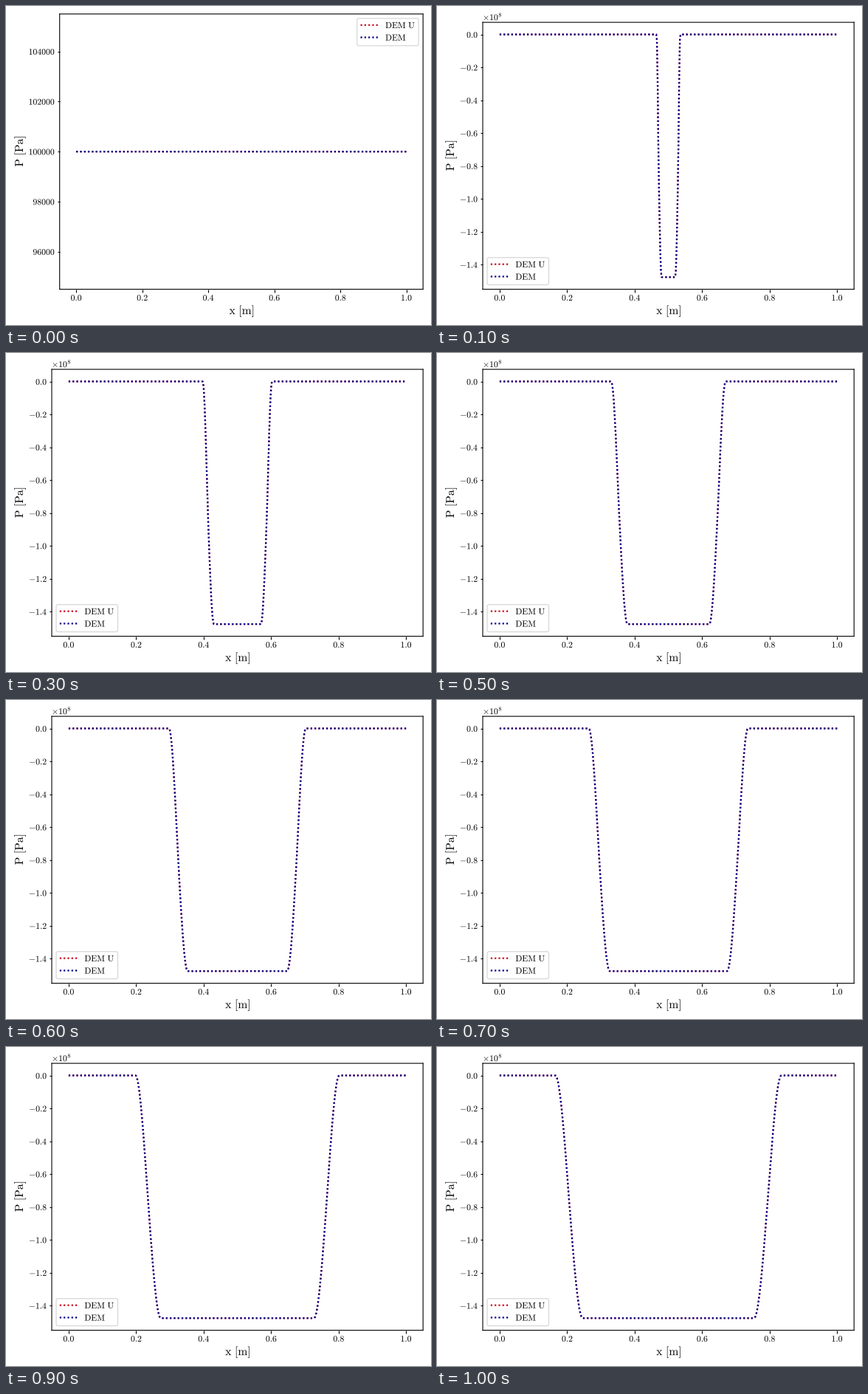
A matplotlib script that plays this animation: 576 by 432 pixels, repeating every 1.1 s.

```python
import numpy as np
import matplotlib.pyplot as plt
from matplotlib.animation import FuncAnimation
from matplotlib.patches import FancyBboxPatch, PathPatch
from matplotlib.textpath import TextPath
from matplotlib.transforms import Affine2D

plt.rcParams.update({
    "mathtext.fontset": "cm", "path.snap": False, "lines.scale_dashes": False,
    "axes.linewidth": 1.1, "xtick.major.width": 1.1, "ytick.major.width": 1.1,
})

W, H = 576, 432
FRAMES, INTERVAL = 11, 100
P0, P_LOW = 1e5, -1.476e8
RIGHT, BOTTOM = 565.2, 383.6
SMALL, LARGE = 11.7, 15.6
SERIES = [("DEM\\ U", "#cc0a1c"), ("DEM", "#00008b")]
DOTS = dict(ls=(0, (2.2, 3.1)), lw=2.25)

fig = plt.figure(figsize=(W / 72, H / 72), dpi=72, facecolor="white")
x = np.linspace(0, 1, 501)


def pressure(k):
    """Two rarefaction fans leaving the centre and widening as they go."""
    if k == 0:
        return np.full_like(x, P0)
    depth = 0.0295 * k - np.abs(x - 0.5)
    half = np.where(depth > 0, 0.0092 * k ** 0.65, 0.0055 * k ** 0.86)
    t = np.clip(depth / half, -1, 1)
    return P0 + (P_LOW - P0) * (0.5 + (3 * t - t ** 3) / 4)


def label(page, px, py, s, size=SMALL, ha="left", rotation=0):
    """Math text as an outline, with its baseline at a stage pixel."""
    path = TextPath((0, 0), f"${s}$", size=size)
    box = path.get_extents()
    anchor = {"left": 0, "center": (box.x0 + box.x1) / 2,
              "right": box.x1 + 0.04 * size}[ha]
    place = (Affine2D().translate(-anchor, 0).rotate_deg(rotation)
             .scale(1, -1).translate(px, py))
    page.add_patch(PathPatch(path, fc="black", lw=0,
                             transform=place + page.transData))


def legend(page, left, top):
    page.add_patch(FancyBboxPatch(
        (left, top), 83.5, 36.9, boxstyle="round,pad=0,rounding_size=2.4",
        fc=(1, 1, 1, 0.8), ec=(0.8, 0.8, 0.8, 0.8), lw=1.2))
    for i, (name, color) in enumerate(SERIES):
        base = top + 13.2 + 16.7 * i
        page.plot([left + 4.8, left + 28.8], [base - 4.2] * 2, color=color, **DOTS)
        label(page, left + 38.4, base, rf"\mathrm{{{name}}}")


def draw(k):
    fig.clear()
    if k == 0:
        left, top = 72.7, 10.8
        low, high = 94500, 105500
        yticks = np.arange(96000, 104001, 2000)
        names = [f"{v:d}" for v in yticks]
    else:
        left, top = 62.0, 22.1
        pad = 0.05 * (P0 - P_LOW)
        low, high = P_LOW - pad, P0 + pad
        yticks = np.arange(-7, 1) * 2e7
        names = [f"{v / 1e8:.1f}" for v in yticks]
    width, height = RIGHT - left, BOTTOM - top

    ax = fig.add_axes([left / W, 1 - BOTTOM / H, width / W, height / H])
    xticks = np.arange(6) / 5
    ax.set(xlim=(-0.05, 1.05), ylim=(low, high))
    ax.set_xticks(xticks, labels=[])
    ax.set_yticks(yticks, labels=[])
    p = pressure(k)
    for _, color in SERIES:
        ax.plot(x, p, color=color, **DOTS)

    # Overlay in stage pixels for all text and the legend
    page = fig.add_axes([0, 0, 1, 1], zorder=5)
    page.axis("off")
    for v in xticks:
        label(page, left + width * (v + 0.05) / 1.1, BOTTOM + 15.3,
              f"{v:.1f}", ha="center")
    for v, s in zip(yticks, names):
        py = BOTTOM - height * (v - low) / (high - low)
        label(page, left - 7, py + 4.15, s, ha="right")
    label(page, (left + RIGHT) / 2, 417.2, r"\mathrm{x\ [m]}", LARGE, "center")
    label(page, 22.9, (top + BOTTOM) / 2, r"\mathrm{P\ [Pa]}", LARGE,
          "center", rotation=90)
    if k == 0:
        legend(page, RIGHT - 89.5, top + 6)
    else:
        label(page, left, top - 3, r"\times 10^{8}")
        legend(page, left + 6, BOTTOM - 42.9)
    page.set(xlim=(0, W), ylim=(H, 0))
    return []


anim = FuncAnimation(fig, draw, frames=FRAMES, interval=INTERVAL,
                     repeat=True, repeat_delay=0)
plt.show()
```
